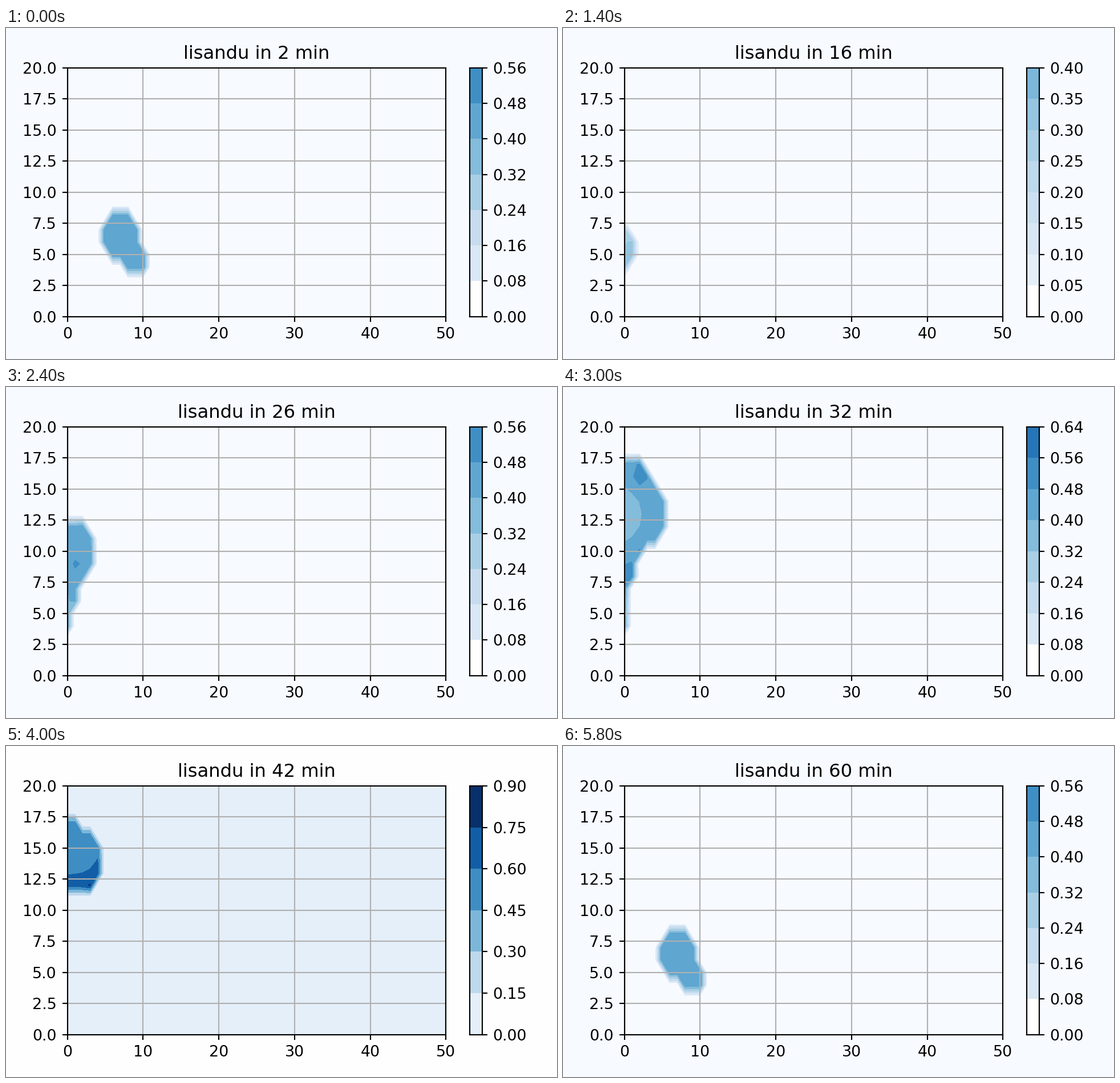
A matplotlib script for the animation above (6000 ms loop, 966x580 px).

```python
import numpy as np
import matplotlib.pyplot as plt
from matplotlib.animation import FuncAnimation
from matplotlib.path import Path

W, H, DPI = 966, 580, 193.2
FRAMES, INTERVAL = 30, 200
VMAX = 0.82       # intensity drawn in the darkest blue
HEADROOM = 1.15   # colour bar range relative to the peak
STEPS = (0.03, 0.04, 0.05, 0.06, 0.08, 0.1, 0.15)

plt.rcParams["font.family"] = "DejaVu Sans"
blues = plt.get_cmap("Blues")
X, Y = np.meshgrid(np.arange(51), np.arange(21))
NODES = np.column_stack([X.ravel(), Y.ravel()])


def outline(corners, n=240):
    """Resample a closed polygon evenly along its length."""
    p = np.array(corners + corners[:1], float)
    d = np.r_[0, np.cumsum(np.hypot(*np.diff(p, axis=0).T))]
    t = np.linspace(0, d[-1], n, endpoint=False)
    return np.column_stack([np.interp(t, d, p[:, 0]), np.interp(t, d, p[:, 1])])


def bump(x, y, height, wx, wy=None):
    return height * np.exp(-((X - x) / wx) ** 2 - ((Y - y) / (wy or wx)) ** 2)


def cell(corners, base, *bumps):
    """A rain cell: its outline and its intensity on the grid."""
    return outline(corners), base + sum(bumps, np.zeros(X.shape))


def dot(x, y, value):
    return cell([(x - .3, y), (x, y + .2), (x + .2, y), (x, y - .2)], value)


east = cell([(6, 8), (8, 8), (9, 7), (9, 6), (10, 5), (10, 4), (8, 4),
             (7, 5), (6, 5), (5, 6), (5, 7)], 0.475)
young = cell([(-2, 10), (1, 10), (2, 9), (2, 5), (0, 3), (-2, 3)], 0.45,
             bump(1, 9, .045, 1.5), bump(-.5, 7, -.12, 1.6))
tall = cell([(-2, 17), (2, 17), (5, 14), (5, 12), (4, 11), (3, 11), (2, 10),
             (1, 9), (1, 8), (0, 7), (0, 4), (-2, 4)], 0.455,
            bump(0, 13, -.12, 2.6), bump(2, 16, .09, 1.1),
            bump(.5, 8, .07, 1.3), bump(2, 10, .05, 1),
            bump(0, 5, -.07, 1.6))
wane = cell([(-2, 17), (2, 17), (5, 14), (4, 12), (2, 11), (-2, 10)], 0.46)
low = cell([(-2, 17), (1, 17), (2, 16), (3, 16), (4, 15), (4, 13), (3, 12),
            (-2, 12)], 0.53,
           bump(2, 12, .14, 6, 1.15), bump(3, 12, .1, .8),
           bump(4.5, 13.5, .12, 1))
fresh = cell([(7, 6), (8, 6), (10, 4), (7, 4), (6, 5)], 0.37,
             bump(7, 6, .12, 1.3), bump(9.5, 4, .12, .9))

TRACKS = [
    [(0, east), (4, dot(0, 4, .205)), (10, young), (15, tall), (18, wane),
     (20, low), (25, dot(0, 15, .41)), (27, dot(0, 15, 0))],
    [(21, dot(9, 3, .3)), (25, fresh), (29, east)],
]


def inside(poly):
    """Grid nodes in the polygon or on its edge."""
    path = Path(poly)
    hit = path.contains_points(NODES, radius=.1)
    return (hit | path.contains_points(NODES, radius=-.1)).reshape(X.shape)


def rain(i):
    z = np.zeros(X.shape)
    for track in TRACKS:
        for (a, (pa, va)), (b, (pb, vb)) in zip(track, track[1:]):
            if a <= i <= b:
                u = (i - a) / (b - a)
                mask = inside(pa + (pb - pa) * u)
                z = np.maximum(z, np.where(mask, va + (vb - va) * u, 0))
                break
    return z


def bar_levels(peak):
    """Round steps that cover the peak in at most eight bands."""
    step = next(s for s in STEPS if 8 * s > peak)
    return step, step * np.arange(int(peak / step) + 2)


def shades(step, levels):
    """Band colours, plot ground and page colour."""
    mids = levels[:-1] + step / 2
    bands = ["white" if m < .055 else blues(min(m / VMAX, 1.0)) for m in mids]
    if step > 0.1:
        return bands, bands[0], "#fefefe"
    page = "#fbfcff" if step < 0.05 else "#f7faff"
    return bands, page, page


def add_axes(x, width):
    return fig.add_axes([x / W, 74.4 / H, width / W, 435.6 / H])


fig = plt.figure(figsize=((W + .001) / DPI, (H + .001) / DPI), dpi=DPI)
ax = add_axes(107.6, 663.7)
cax = add_axes(812.8, 21.8)


def draw(i):
    z = rain(i)
    step, levels = bar_levels(HEADROOM * z.max())
    bands, ground, page = shades(step, levels)
    fig.set_facecolor(page)

    ax.clear()
    ax.set_facecolor(ground)
    ax.contourf(X, Y, z, levels=levels[1:], colors=bands[1:])
    ax.set(xlim=(0, 50), ylim=(0, 20), xticks=np.arange(0, 51, 10),
           yticks=np.arange(0, 20.1, 2.5))
    ax.grid(True)
    ax.set_title(f"lisandu in {2 * i + 2} min")

    cax.clear()
    for lo, hi, color in zip(levels, levels[1:], bands):
        cax.axhspan(lo, hi, facecolor=color, edgecolor="none", lw=0,
                    antialiased=False)
    cax.yaxis.tick_right()
    digits = 1 if step == 0.1 else 2
    cax.set(xlim=(0, 1), ylim=(0, levels[-1]), xticks=[])
    cax.set_yticks(levels, [f"{v:.{digits}f}" for v in levels])
    return []


anim = FuncAnimation(fig, draw, frames=FRAMES, interval=INTERVAL,
                     repeat=True, repeat_delay=0)
plt.show()
```
